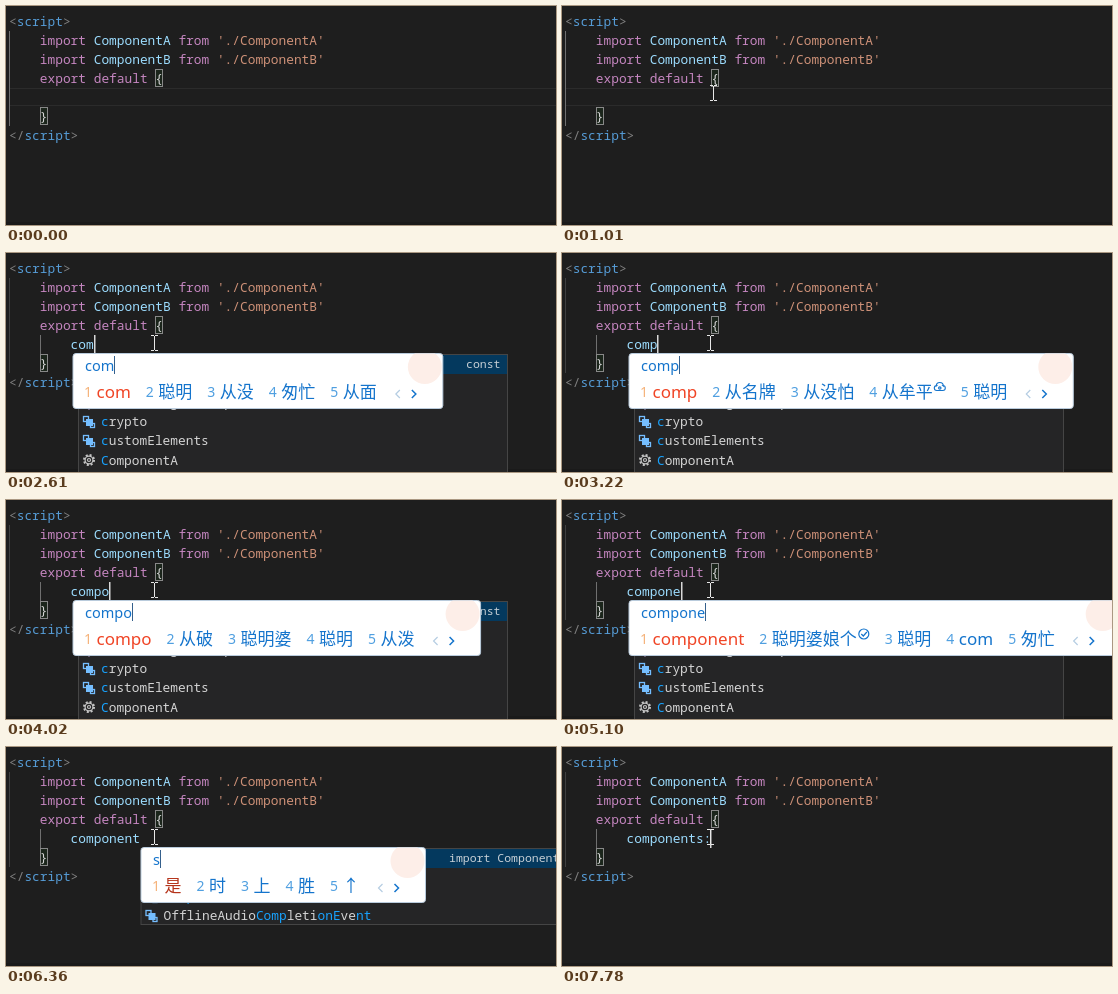
Animation of 550 by 219 pixels, one loop 8000 ms. Source, as an HTML page with a canvas:

```html
<!DOCTYPE html>
<html lang="en">
<head>
<meta charset="utf-8">
<title>Editor typing</title>
<style>
html, body { margin: 0; width: 100%; height: 100%; overflow: hidden; background: #1e1e1e; }
canvas { display: block; }
</style>
</head>
<body>
<canvas id="stage" width="550" height="219"></canvas>
<script>
const ctx = document.getElementById('stage').getContext('2d');
const LOOP = 8000;
const CHAR = 7.7, LEFT = 3, TOP = 6, ROW = 19;
const MONO = '12.83px "Noto Sans Mono", "DejaVu Sans Mono", monospace';
const SMALL_MONO = '11.5px "Noto Sans Mono", "DejaVu Sans Mono", monospace';
const INPUT = '14.5px "Noto Sans", "Noto Sans CJK SC", sans-serif';
const CAND = '17px "Noto Sans", "Noto Sans CJK SC", "Noto Sans CJK", sans-serif';
const NUM = '14px "Noto Sans", sans-serif';
const C = {
  tag: '#808080', name: '#569cd6', key: '#c586c0', id: '#9cdcfe',
  str: '#ce9178', plain: '#d4d4d4', match: '#18a3ff'
};

const CODE = [
  [0, [['<', C.tag], ['script', C.name], ['>', C.tag]]],
  [4, [['import ', C.key], ['ComponentA ', C.id], ['from ', C.key], ["'./ComponentA'", C.str]]],
  [4, [['import ', C.key], ['ComponentB ', C.id], ['from ', C.key], ["'./ComponentB'", C.str]]],
  [4, [['export default ', C.key], ['{', C.plain]]],
  null,
  [4, [['}', C.plain]]],
  [0, [['</', C.tag], ['script', C.name], ['>', C.tag]]]
];

// [start ms, value] tracks; the last entry already begun is current
const TYPED = [
  [0, ''], [1990, 'c'], [2260, 'co'], [2610, 'com'], [3220, 'comp'], [3740, 'compo'],
  [4290, 'compon'], [5100, 'compone'], [5270, 'componen'], [5360, 'component'],
  [6450, 'components'], [7780, 'components:']
];
const CARET = [
  [0, false], [1110, true], [1550, false], [1990, true], [4830, false], [5100, true],
  [6060, false], [6450, true], [7510, false], [7780, true]
];
const LONG = ['component', '聪明婆娘个', '聪明', 'com', '匆忙'];
const MID = ['compo', '从破', '聪明婆', '聪明', '从泼', '匆'];
const POPUP = [
  [0, null],
  [1900, { text: 'c', list: ['成', '才', '处', '吃', '@face'] }],
  [2260, { text: 'co', list: ['从', '错', '次', '草', '村'] }],
  [2610, { text: 'com', list: ['com', '聪明', '从没', '匆忙', '从面'] }],
  [3220, { text: 'comp', list: ['comp', '从名牌', '从没怕', '从牟平', '聪明'], cloud: 3 }],
  [3740, { text: 'compo', list: MID.slice(0, 5) }],
  [4290, { text: 'compon', list: MID.slice(0, 5) }],
  [5100, { text: 'compone', list: LONG, check: 1 }],
  [5270, { text: 'componen', list: LONG, check: 1 }],
  [5360, { text: 'component', list: ['component', '聪明', '匆忙', 'com', '从门'] }],
  [5820, null],
  [6360, { text: 's', x: 135, list: ['是', '时', '上', '胜', '↑'] }],
  [6800, null]
];
const FIRST = {
  x: 72, h: 130, note: 'const', noteX: 460,
  items: [['key', '*c*onst'], ['key', '*c*ontinue'], ['cube', '*c*reateImageBitmap'],
    ['var', '*c*rypto'], ['var', '*c*ustomElements'], ['gear', '*C*omponentA']]
};
const SECOND = {
  x: 134.5, h: 77, note: 'import ComponentA', noteX: 443,
  items: [['var', '*Component*A'], ['var', '*Component*B'],
    ['var', '*Comp*ositi*onE*ve*nt*'], ['var', 'OfflineAudio*Comp*leti*onE*ve*nt*']]
};
const SUGGEST = [[0, null], [2080, FIRST], [6060, null], [6100, SECOND], [6890, null]];

function at(track, t) {
  let value;
  for (const [start, v] of track) if (t >= start) value = v;
  return value;
}

function rect(x, y, w, h, color) {
  ctx.fillStyle = color;
  ctx.fillRect(x, y, w, h);
}

function text(s, x, y, color, font) {
  ctx.font = font;
  ctx.fillStyle = color;
  ctx.fillText(s, x, y);
  return ctx.measureText(s).width;
}

function mono(s, x, y, color) {
  [...s].forEach((ch, i) => text(ch, x + i * CHAR, y, color, MONO));
  return s.length * CHAR;
}

function line(points, color, width = 1) {
  ctx.strokeStyle = color;
  ctx.lineWidth = width;
  ctx.beginPath();
  points.forEach(([x, y], i) => i ? ctx.lineTo(x, y) : ctx.moveTo(x, y));
  ctx.stroke();
}

function circle(x, y, r, color, filled) {
  ctx.beginPath();
  ctx.arc(x, y, r, 0, Math.PI * 2);
  ctx.lineWidth = 1.2;
  ctx.fillStyle = ctx.strokeStyle = color;
  filled ? ctx.fill() : ctx.stroke();
}

function bracketBox(col, row) {
  const x = Math.round(LEFT + col * CHAR);
  const y = TOP + row * ROW;
  rect(x, y, 8, 18, 'rgba(0,100,0,.1)');
  ctx.strokeStyle = '#888';
  ctx.lineWidth = 1;
  ctx.strokeRect(x + .5, y + .5, 7, 17);
}

function drawEditor(t) {
  const typed = at(TYPED, t);
  rect(0, 0, 550, 219, '#1e1e1e');
  rect(0, 216, 550, 3, '#1a1a1a');
  if (t < 1900) {
    rect(4, 82, 546, 1, '#2b2b2b');
    rect(4, 99, 546, 1, '#2b2b2b');
  }
  rect(3, 25, 1, 95, typed ? '#404040' : '#707070');
  if (typed) rect(34, 82, 1, 19, '#707070');
  bracketBox(19, 3);
  bracketBox(4, 5);
  CODE.forEach((row, i) => {
    if (!row) return;
    let x = LEFT + row[0] * CHAR;
    for (const [s, color] of row[1]) x += mono(s, x, TOP + i * ROW + 14, color);
  });
  const end = 64.6 + mono(typed, 64.6, 96, C.id);
  if (at(CARET, t)) rect(Math.round(end) - (typed.length > 10 ? 1 : 0), 82, 1.5, 19, '#d8d8d8');
}

const ICONS = {
  key(x, y) {
    for (const dy of [-4, 0, 4]) {
      rect(x, y + dy - .5, 5, 1.5, '#c5c5c5');
      rect(x + 6, y + dy - .5, 6, 1.5, '#c5c5c5');
    }
  },
  cube(x, y) {
    const color = '#b9a3d0';
    line([[x + 6, y - 6], [x + 11, y - 3], [x + 11, y + 3], [x + 6, y + 6],
      [x + 1, y + 3], [x + 1, y - 3], [x + 6, y - 6]], color, 1.2);
    line([[x + 1, y - 3], [x + 6, y], [x + 11, y - 3]], color, 1.2);
    line([[x + 6, y], [x + 6, y + 6]], color, 1.2);
  },
  var(x, y) {
    ctx.strokeStyle = '#75beff';
    ctx.lineWidth = 1.3;
    ctx.strokeRect(x + .5, y - 5.5, 5, 5);
    ctx.strokeRect(x + 7.5, y + 1.5, 4, 4);
    rect(x + 3, y - 3, 7, 7, '#75beff');
  },
  gear(x, y) {
    ctx.setLineDash([2, 1.93]);
    ctx.strokeStyle = '#c5c5c5';
    ctx.lineWidth = 2;
    ctx.beginPath();
    ctx.arc(x + 6, y, 5, 0, Math.PI * 2);
    ctx.stroke();
    ctx.setLineDash([]);
    circle(x + 6, y, 3.9, '#c5c5c5');
    circle(x + 6, y, 1.5, '#c5c5c5');
  }
};

function drawSuggest(box) {
  if (!box) return;
  const { x, h, items } = box;
  rect(x, 101, 430, h, '#454545');
  rect(x + 1, 102, 428, h - 2, '#252526');
  rect(x + 1, 102, 428, 19, '#04395e');
  items.forEach(([icon, label], i) => {
    const mid = 111.5 + i * 19.1;
    ICONS[icon](x + 5, Math.round(mid));
    let tx = x + 23;
    label.split('*').forEach((part, k) => {
      tx += mono(part, tx, mid + 4.5, k % 2 ? C.match : C.plain);
    });
  });
  text(box.note, box.noteX, 115, '#c8d0d6', SMALL_MONO);
}

function drawCloud(x, y) {
  ctx.beginPath();
  ctx.arc(x + 3, y + 1, 2.5, Math.PI * .5, Math.PI * 1.5);
  ctx.arc(x + 6, y - 1, 3.5, Math.PI, 0);
  ctx.arc(x + 9, y + 1, 2.5, -Math.PI / 2, Math.PI / 2);
  ctx.closePath();
  ctx.strokeStyle = '#1474cc';
  ctx.lineWidth = 1.1;
  ctx.stroke();
  circle(x + 6, y + 1, 1.2, '#1474cc');
}

function drawPopup(p) {
  if (!p) return;
  const x = p.x || 67;
  const slots = [];
  let cx = x + 11;
  ctx.font = CAND;
  for (const word of p.list) {
    const w = word === '@face' ? 31 : ctx.measureText(word).width;
    slots.push([word, cx, w]);
    cx += 12.5 + w + 15;
    if (slots.length - 1 === p.cloud || slots.length - 1 === p.check) cx += 13;
  }
  const end = cx - 15;
  const w = end + 66 - x;

  ctx.save();
  ctx.beginPath();
  ctx.roundRect(x, 100.5, w, 55, 3);
  ctx.fillStyle = '#fff';
  ctx.fill();
  ctx.strokeStyle = '#b9cbdc';
  ctx.lineWidth = 1;
  ctx.stroke();
  ctx.clip();
  circle(x + w - 18, 114, 17, '#fdeee8', true);
  const tw = text(p.text, x + 12, 118, '#1474cc', INPUT);
  rect(Math.round(x + 12 + tw), 103, 1, 18, p.text === 'c' ? '#a03018' : '#35608c');

  slots.forEach(([word, sx, sw], i) => {
    const tx = sx + 12.5;
    text(i + 1, sx, 144, i ? '#4f9fe0' : '#f5b27a', NUM);
    if (word === '@face') {
      circle(tx + 10, 138, 9.5, '#efdfda', true);
      ctx.fillStyle = '#5aa5dd';
      ctx.beginPath();
      ctx.moveTo(tx + 24, 146);
      ctx.lineTo(tx + 31, 146);
      ctx.lineTo(tx + 27.5, 150);
      ctx.fill();
    } else {
      const first = word.length > 1 ? '#f04526' : '#b5331a';
      text(word, tx, 145, i ? '#1474cc' : first, CAND);
    }
    if (i === p.cloud) drawCloud(tx + sw + 1, 134);
    if (i === p.check) {
      const mx = tx + sw + 7;
      circle(mx, 134, 5, '#1474cc');
      line([[mx - 2.5, 134], [mx - .5, 136], [mx + 3, 132]], '#1474cc', 1.2);
    }
  });
  line([[end + 23, 137], [end + 19, 141], [end + 23, 145]], '#b5cde2', 1.2);
  line([[end + 35, 137], [end + 39, 141], [end + 35, 145]], '#1474cc', 1.5);
  ctx.restore();
}

function drawMouse(t) {
  if (t < 130) return;
  let x = 148.5, y = 90;
  if (t < 1010) {
    const k = Math.min(9, Math.floor((t - 130) / 87.7)) / 9;
    const e = 1 - (1 - k) ** 2;
    x = 480 - 326 * e;
    y = 210 - 124 * e;
  } else if (t < 1110) {
    x = 151;
    y = 87;
  }
  x = Math.floor(x);
  y = Math.round(y);
  rect(x, y - 7, 1, 14, '#e8e8e8');
  for (const dy of [-8, 7]) {
    rect(x - 3, y + dy, 3, 1, '#e8e8e8');
    rect(x + 1, y + dy, 3, 1, '#e8e8e8');
  }
}

function frame() {
  const t = performance.now() % LOOP;
  drawEditor(t);
  drawSuggest(at(SUGGEST, t));
  drawPopup(at(POPUP, t));
  drawMouse(t);
  requestAnimationFrame(frame);
}
frame();
</script>
</body>
</html>
```
